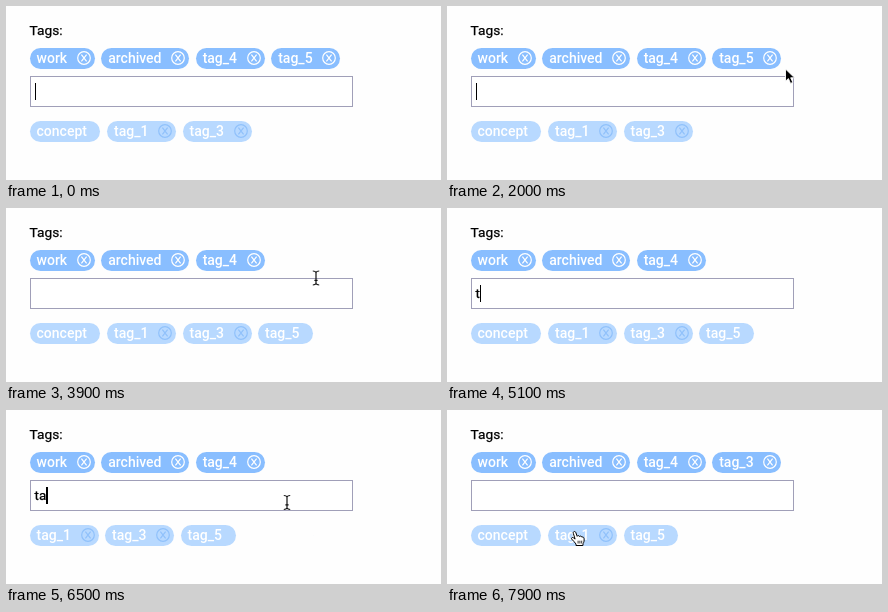
Write an HTML page that moves like this. It is 435 by 174 pixels and loops after 8000 ms.

```html
<!DOCTYPE html>
<html>
<head>
<meta charset="utf-8">
<style>
  html, body { margin: 0; width: 100%; height: 100%; overflow: hidden; background: #fefefe; }
  body { position: relative; font: 14px/17px Roboto, sans-serif; color: #000; }
  body > * { position: absolute; }
  #label, #typed { -webkit-text-stroke: .25px #000; }
  #label { left: 23.6px; top: 16px; font-size: 13.7px; }
  #box { left: 24px; top: 70px; width: 323px; height: 31px; box-sizing: border-box; border: 1px solid #a09fb8; background: #fff; }
  #typed { left: 28.6px; top: 77px; font-size: 13.4px; white-space: pre; }
  #caret { display: inline-block; width: 1.3px; height: 17px; background: #000; vertical-align: top; }
  .row { left: 23.5px; display: flex; gap: 6.5px; }
  #chosen { top: 41.5px; --pill: #89beff; --mark: #fff; }
  #others { top: 114.5px; --pill: #b8d9ff; --mark: #90c1fb; }
  .tag { display: flex; height: 21px; padding: 0 13.5px 0 7px; border-radius: 11px; background: var(--pill); color: #fff; font-weight: 500; line-height: 21px; }
  .tag.closable { padding-right: 4px; }
  .tag svg { margin: 3px 0 0 9.6px; width: 14px; height: 14px; fill: none; stroke: var(--mark); stroke-width: 1.2; }
  #pointer { left: 0; top: 0; overflow: visible; width: 1px; height: 1px; }
</style>
</head>
<body>
<div id="label">Tags:</div>
<div id="chosen" class="row"></div>
<div id="box"></div>
<div id="typed"><span id="text"></span><span id="caret"></span></div>
<div id="others" class="row"></div>
<svg id="pointer">
  <path id="arrow" d="M0 0V12.2L2.9 9.6L5 14.4L7.3 13.4L5.2 8.8H9Z" fill="#000" stroke="#fff" stroke-width=".9"/>
  <path id="beam" d="M-3.2-7Q-.6-7 0-5.6Q.6-7 3.2-7M0-5.6V5.6M-3.2 7Q-.6 7 0 5.6Q.6 7 3.2 7M-1.6 2.3H1.6" fill="none" stroke="#111" stroke-width="1.2"/>
  <g id="hand" stroke="#000" stroke-linejoin="round">
    <path d="M1.5 14V12.5C.5 10.8-1.2 9.5-2.8 7.6C-3.6 6.4-2 5.4-.9 6.4L.6 7.6L-1.2 1.8C-1.7 0 .6-.8 1.3 1L2.7 4.8C3 3.8 4.8 3.9 5 5C5.6 4.2 7.2 4.6 7.4 5.7C8.2 5.1 9.4 5.7 9.5 6.9C9.8 9 9.6 10.5 8.6 12L8.4 14Z" fill="#fff"/>
    <path d="M3.6 9.2V12M5.4 9.2V12M7.2 9.2V12" stroke-width=".8"/>
  </g>
</svg>
<script>
const LOOP = 8000, STEP = 100;
const $ = id => document.getElementById(id);
const cross = '<svg><circle cx="7" cy="7" r="6.3"/><path d="M4.4 3.7L9.6 10.4M9.6 3.7L4.4 10.4"/></svg>';

// A trailing "x" after a space marks a tag with a close button.
const tags = list => list.split(',').map(item => {
  const [name, close] = item.split(' ');
  return `<div class="tag${close ? ' closable' : ''}">${name}${close ? cross : ''}</div>`;
}).join('');

// start, chosen tags, other tags, typed text
const states = [
  [0, 'work x,archived x,tag_4 x,tag_5 x', 'concept,tag_1 x,tag_3 x', ''],
  [2700, 'work x,archived x,tag_4 x', 'concept,tag_1 x,tag_3 x,tag_5', ''],
  [5100, 'work x,archived x,tag_4 x', 'concept,tag_1 x,tag_3 x,tag_5', 't'],
  [5500, 'work x,archived x,tag_4 x', 'tag_1 x,tag_3 x,tag_5', 'ta'],
  [7500, 'work x,archived x,tag_4 x,tag_3 x', 'concept,tag_1 x,tag_5', '']
];

// start, x, y, pointer shape
const moves = [
  [0, 470, 82, ''],
  [1600, 470, 82, 'arrow'],
  [1700, 430, 80, 'arrow'],
  [2000, 338.5, 63, 'arrow'],
  [2300, 323, 54, 'hand'],
  [2700, 323, 54, 'hand'],
  [2800, 324, 54, 'arrow'],
  [3800, 324, 54, 'arrow'],
  [3900, 310, 70, 'beam'],
  [4300, 283, 87, 'beam'],
  [5100, 283, 87, ''],
  [6400, 283, 87, ''],
  [6500, 281, 92.5, 'beam'],
  [6700, 222, 121, 'arrow'],
  [6900, 156, 132, 'hand'],
  [7200, 127.5, 121.5, 'hand'],
  [LOOP, 127.5, 121.5, 'hand']
];

// The blink restarts on focus and on each key press.
const blinkStarts = [-200, 4300, 5100, 5500];
const focused = t => t < 2700 || (t >= 4300 && t < 7500);
const caretOn = t => focused(t) && (t - blinkStarts.findLast(s => s <= t)) % 1000 < 500;

let shown;
function draw(t) {
  const state = states.findLast(s => s[0] <= t);
  if (state !== shown) {
    shown = state;
    $('chosen').innerHTML = tags(state[1]);
    $('others').innerHTML = tags(state[2]);
    $('text').textContent = state[3];
  }
  $('caret').style.visibility = caretOn(t) ? 'visible' : 'hidden';

  const i = moves.findLastIndex(m => m[0] <= t);
  const [start, x, y, shape] = moves[i], [end, nextX, nextY] = moves[i + 1];
  const k = (t - start) / (end - start);
  for (const id of ['arrow', 'beam', 'hand']) {
    $(id).style.display = id === shape ? '' : 'none';
  }
  $('pointer').style.transform = `translate(${x + (nextX - x) * k}px, ${y + (nextY - y) * k}px)`;
}

function frame() {
  draw(Math.floor(performance.now() % LOOP / STEP) * STEP);
  requestAnimationFrame(frame);
}
frame();
</script>
</body>
</html>
```
